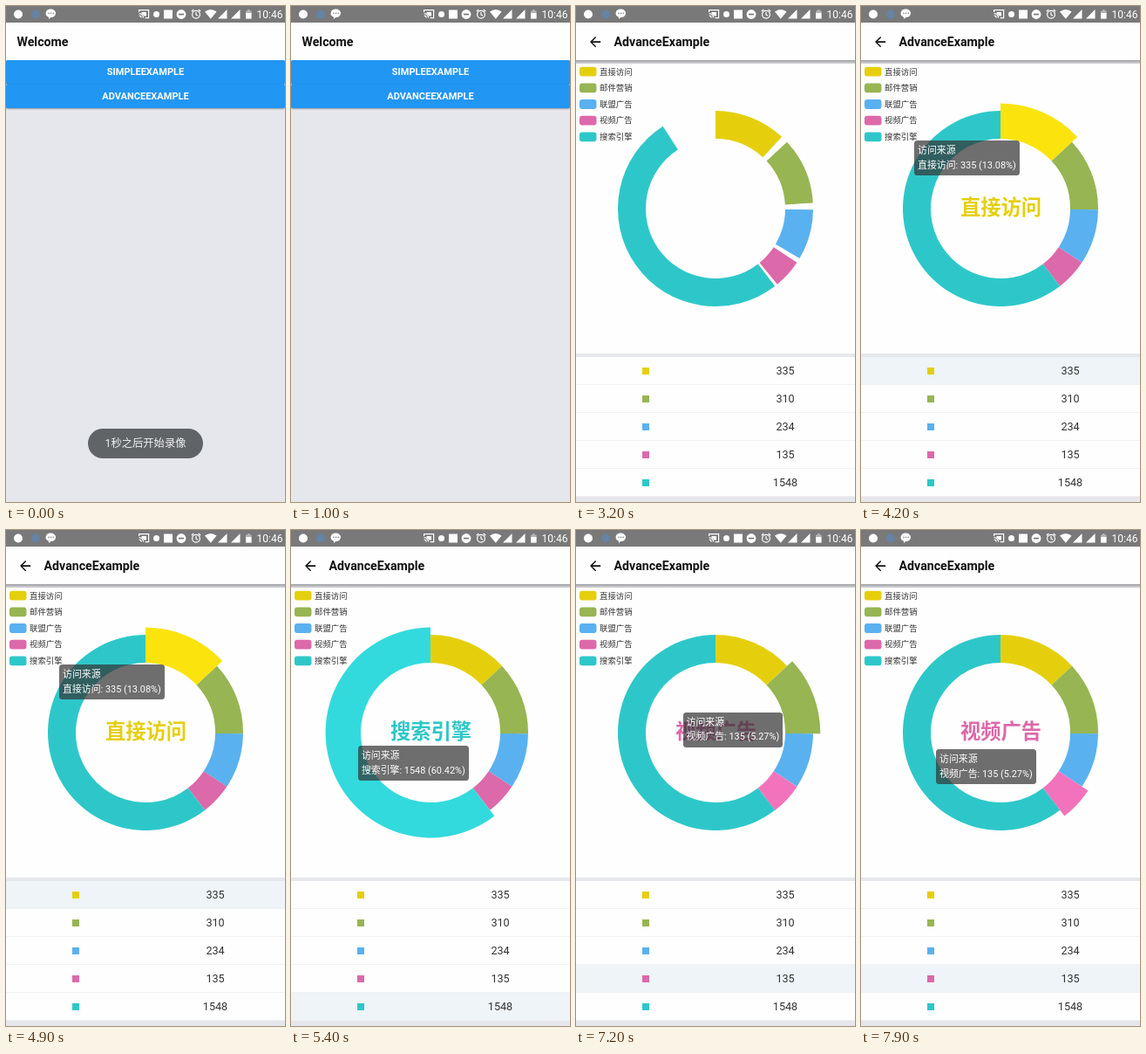
Recreate the animation shown at these times as an HTML page. Size 320 px wide and 568 px high, loop 8 s.

```html
<!DOCTYPE html>
<html lang="zh">
<head>
<meta charset="utf-8">
<title>AdvanceExample</title>
<style>
html, body { margin: 0; width: 100%; height: 100%; overflow: hidden; }
body { position: relative; background: #e6e7ec; font-family: Roboto, "Noto Sans CJK SC", "Noto Sans CJK", sans-serif; }
#stage { position: absolute; left: 0; top: 0; width: 320px; height: 568px; overflow: hidden; background: #e6e7ec; }
#stage div, #stage svg { position: absolute; white-space: nowrap; }
#status { left: 0; top: 0; z-index: 6; }
#header { left: 0; top: 19px; width: 320px; height: 43px; background: #fefefe; z-index: 5; }
.title { top: 0; line-height: 44px; font-size: 14.2px; font-weight: 700; color: #111; }
.btn { left: 0; width: 320px; height: 27.5px; line-height: 28px; border-radius: 2px; background: #2196f3;
  box-shadow: 0 1px 2px rgba(0,0,0,.35); color: #fff; font-size: 11px; font-weight: 700; text-align: center; }
#toast { left: 94px; top: 484px; width: 132px; height: 34px; line-height: 34px; border-radius: 17px;
  background: #616467; color: #f0f0f0; font-size: 12.3px; text-align: center; }
#page { left: 0; top: 62px; width: 320px; height: 506px; background: #e6e7ec; }
#shade { left: 0; top: 62px; width: 320px; height: 5px; z-index: 5; background: linear-gradient(rgba(0,0,0,.32), rgba(0,0,0,0)); }
#card { left: 0; top: 4px; width: 320px; height: 332px; background: #fefefe; }
.row { left: 0; width: 320px; height: 32px; box-sizing: border-box; border-bottom: 1px solid #f1f1f2; }
.row i { position: absolute; left: 76px; top: 12px; width: 8px; height: 8px; }
.row span { position: absolute; left: 160px; width: 160px; line-height: 32px; font-size: 12.6px; color: #333; text-align: center; }
#chart { left: 0; top: -62px; }
#tip { left: 0; top: 0; padding: 4px; height: 32px; line-height: 16.5px; border-radius: 3.5px;
  background: rgba(50,50,50,.7); color: #fff; font-size: 10.9px; }
</style>
</head>
<body>
<div id="stage">
  <svg id="status" width="320" height="19" fill="#fff">
    <rect width="320" height="19" fill="#797979"/>
    <circle cx="14" cy="9.5" r="5"/>
    <circle cx="34" cy="9.5" r="5" fill="#6683a4"/>
    <path d="M51.500 3.500a5.600 4.800 0 0 1 0 9.600l-2.500 2v-2.400a5.600 4.800 0 0 1 2.500-9.200z"/>
    <g fill="#797979"><circle cx="49" cy="8.300" r=".8"/><circle cx="51.600" cy="8.300" r=".8"/><circle cx="54.200" cy="8.300" r=".8"/></g>
    <g fill="none" stroke="#fff" stroke-width="1.200">
      <path d="M152.600 7V4.600h11v9h-4M152.600 8.600a5 5 0 0 1 5 5M152.600 11a2.600 2.600 0 0 1 2.600 2.600"/>
      <circle cx="218" cy="9.800" r="4.400"/>
      <path d="M218 7v3l2 1.300M212.800 6.200l2.500-2.200M223.200 6.200l-2.500-2.200"/>
    </g>
    <path d="M155.500 7h5.500v4.500h-2.500l-3-3z"/>
    <circle cx="172.500" cy="9.500" r="3.500"/>
    <rect x="181" y="4.500" width="10" height="10"/>
    <circle cx="201" cy="9.500" r="5.400"/>
    <rect x="198" y="8.700" width="6" height="1.700" fill="#797979"/>
    <path d="M228 6.500q6.800-5 13.600 0l-6.800 8.300zM243 14.500h10.500V4zM258 14.500h10.500V4z"/>
    <path d="M275 5.500h2v-1.500h2.600v1.500h2v3h-6.600z" fill="#b4b4b4"/>
    <rect x="275" y="8" width="6.600" height="6.600"/>
    <text x="287.500" y="14" font-size="12">10:46</text>
  </svg>
  <div id="header">
    <div id="home" class="title" style="left:12.5px">Welcome</div>
    <svg id="back" width="26" height="26" viewBox="0 0 26 26" style="left:12.800px;top:12.700px">
      <path transform="scale(.76)" fill="#111" d="M20 11H7.830l5.590-5.590L12 4l-8 8 8 8 1.410-1.410L7.830 13H20z"/>
    </svg>
    <div id="name" class="title" style="left:43.5px">AdvanceExample</div>
  </div>
  <div class="btn" style="top:62px">SIMPLEEXAMPLE</div>
  <div class="btn" style="top:89.5px">ADVANCEEXAMPLE</div>
  <div id="toast">1秒之后开始录像</div>
  <div id="page">
    <div id="card"></div>
    <svg id="chart" width="320" height="400">
      <g id="legend" font-size="9.4" fill="#333"></g>
      <g id="pie"></g>
      <text id="label" x="160.500" y="238.800" font-size="23.300" font-weight="700" text-anchor="middle"></text>
    </svg>
    <div id="tip"></div>
  </div>
  <div id="shade"></div>
</div>
<script>
const LOOP = 8000, PIE_START = 2650, CX = 160, CY = 232, R_IN = 80, R_OUT = 112, LIFT = 8.4;
const data = [
  ['直接访问', 335, [229, 207, 13]],
  ['邮件营销', 310, [151, 181, 82]],
  ['联盟广告', 234, [90, 177, 239]],
  ['视频广告', 135, [220, 105, 170]],
  ['搜索引擎', 1548, [46, 199, 201]]
].map(([name, value, rgb]) => ({ name, value, rgb }));
// Selections: start time, item, tooltip corner
const picks = [
  { at: 3900, item: 0, x: 61, y: 154 },
  { at: 5150, item: 4, x: 77, y: 248 },
  { at: 6100, item: 1, x: 123, y: 208 },
  { at: 7200, item: 3, x: 86, y: 251 }
];

const $ = id => document.getElementById(id);
const clamp = v => Math.min(1, Math.max(0, v));
const span = (t, from, len) => clamp((t - from) / len);
const cubicOut = p => 1 - (1 - p) ** 3;
const quintOut = p => 1 - (1 - p) ** 5;
const elasticOut = p => p <= 0 ? 0 : p >= 1 ? 1 : 2 ** (-10 * p) * Math.sin((p - .1) * Math.PI * 5) + 1;
const mix = (a, b, p) => a + (b - a) * p;
const css = (rgb, k = 1) => `rgb(${rgb.map(c => Math.min(255, c * k | 0))})`;

function svg(parent, tag, attrs, text = '') {
  const el = document.createElementNS('http://www.w3.org/2000/svg', tag);
  for (const k in attrs) el.setAttribute(k, attrs[k]);
  el.textContent = text;
  return parent.appendChild(el);
}

const total = data.reduce((sum, d) => sum + d.value, 0);
let angle = 0;
data.forEach((d, i) => {
  d.from = angle;
  d.to = angle += d.value / total * Math.PI * 2;
  d.share = +(d.value / total * 100).toFixed(2);
  d.color = css(d.rgb);
  d.bright = css(d.rgb, 1.1);
  const y = 75 + i * 18.65;
  svg($('legend'), 'rect', { x: 4, y: y - 5.2, width: 19.5, height: 10.8, rx: 3, fill: d.color });
  svg($('legend'), 'text', { x: 27, y: y + 3.5 }, d.name);
  d.path = svg($('pie'), 'path', {});
  d.row = document.createElement('div');
  d.row.className = 'row';
  d.row.style.top = 340 + i * 31.9 + 'px';
  d.row.innerHTML = `<i style="background:${d.color}"></i><span>${d.value}</span>`;
  $('page').insertBefore(d.row, $('chart'));
});

function sector(r, from, to) {
  if (to - from < .001) return '';
  const at = (rad, a) => `${CX + rad * Math.sin(a)} ${CY - rad * Math.cos(a)}`;
  const big = to - from > Math.PI ? 1 : 0;
  return `M${at(r, from)}A${r} ${r} 0 ${big} 1 ${at(r, to)}L${at(R_IN, to)}A${R_IN} ${R_IN} 0 ${big} 0 ${at(R_IN, from)}Z`;
}

function drawPie(t, now, prev) {
  const grow = cubicOut(span(t, PIE_START, 1000));
  const sweep = grow * Math.PI * 2;
  const lift = now ? elasticOut(span(t, now.at, 300)) : 0;
  data.forEach((d, i) => {
    const on = now && now.item === i;
    const off = prev && prev.item === i;
    const r = R_OUT + LIFT * (on ? lift : off ? 1 - lift : 0);
    d.path.setAttribute('d', sector(r, d.from, Math.min(sweep, mix(d.from, d.to, grow))));
    d.path.setAttribute('fill', on ? d.bright : d.color);
    d.row.style.background = on ? '#eef4f8' : '#fefefe';
  });
}

function drawTip(t, now, prev) {
  const tip = $('tip');
  tip.style.display = now ? '' : 'none';
  $('label').textContent = now ? data[now.item].name : '';
  if (!now) return;
  const d = data[now.item], start = prev || now;
  const p = quintOut(span(t, now.at, 400));
  tip.style.left = mix(start.x, now.x, p) + 'px';
  tip.style.top = mix(start.y, now.y, p) - 62 + 'px';
  tip.innerHTML = `访问来源<br>${d.name}: ${d.value} (${d.share}%)`;
  $('label').setAttribute('fill', d.color);
}

function draw(t) {
  $('toast').style.opacity = 1 - span(t, 250, 400);

  const enter = span(t, 1650, 350);
  $('page').style.opacity = $('shade').style.opacity = clamp(enter * 1.6);
  $('page').style.transform = `translateY(${44 * (1 - cubicOut(enter))}px)`;
  $('home').style.opacity = 1 - span(t, 1650, 250);
  $('name').style.opacity = span(t, 1700, 320);
  $('back').style.opacity = span(t, 1700, 400);

  const n = picks.filter(p => p.at <= t).length;
  const now = picks[n - 1], prev = picks[n - 2];
  $('legend').style.display = t >= PIE_START ? '' : 'none';
  drawPie(t, now, prev);
  drawTip(t, now, prev);
}

const begin = performance.now();
function tick() {
  draw((performance.now() - begin) % LOOP);
  requestAnimationFrame(tick);
}
tick();
</script>
</body>
</html>
```
